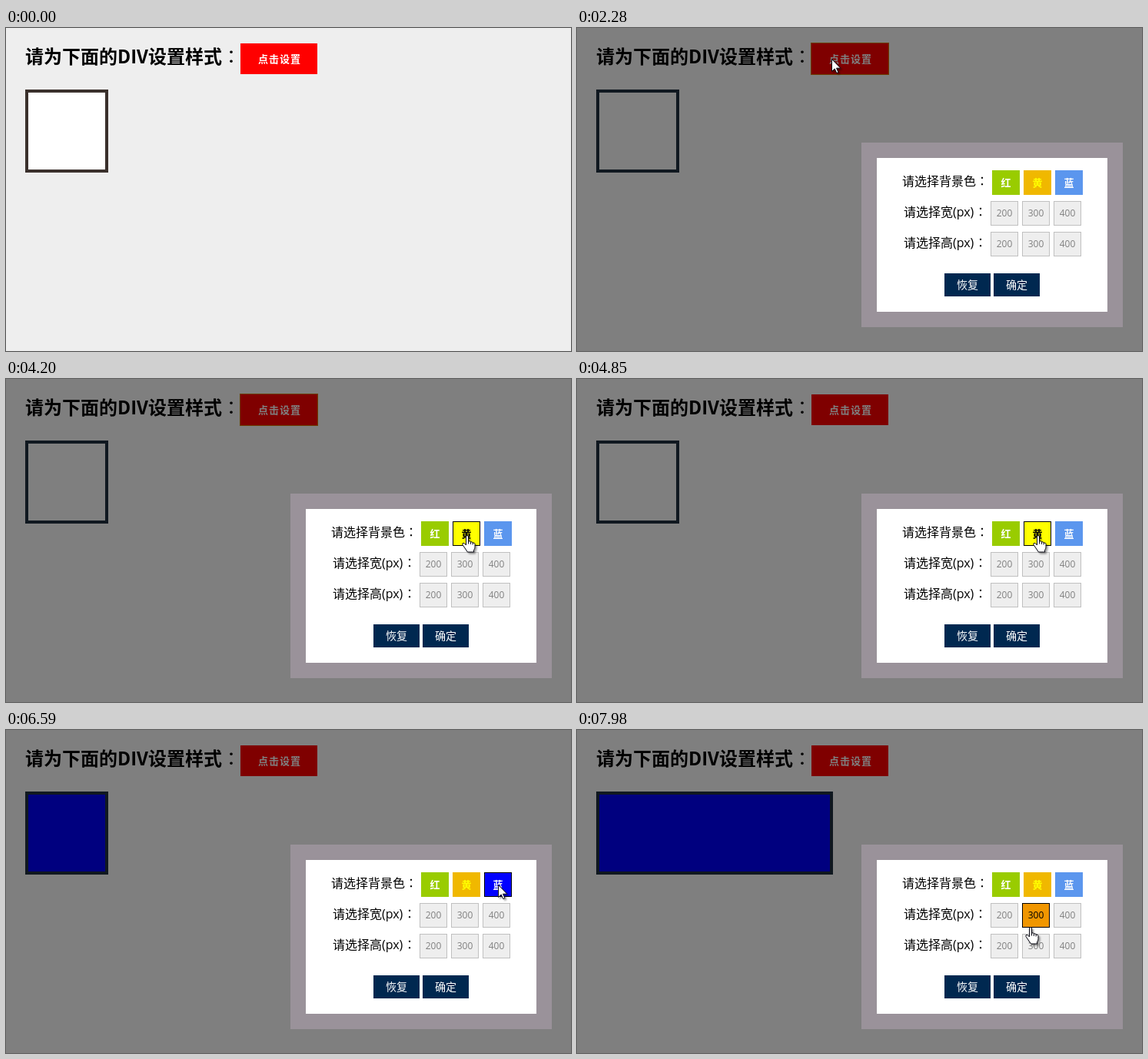
Write an HTML page that moves like this. It is 735 px wide and 420 px high and loops after 8000 ms.

```html
<!DOCTYPE html>
<html lang="zh-CN">
<head>
<meta charset="utf-8">
<title>设置样式</title>
<style>
html, body { margin: 0; height: 100%; overflow: hidden; background: #eee; }
svg { display: block; width: 735px; height: 420px; }
text { font-family: "Open Sans", "Noto Sans CJK SC", sans-serif; }
.title { font-family: "Noto Sans CJK SC", sans-serif; font-weight: 700; }
.colon { font-family: "Noto Sans CJK TC", sans-serif; }
.mid { text-anchor: middle; }
.cursor { fill: #fff; stroke: #0a0a14; stroke-linejoin: round; filter: drop-shadow(2px 2px 1px rgba(0, 0, 0, .4)); }
.beam { fill: none; stroke: #000; }
</style>
</head>
<body>
<svg id="stage" viewBox="0 0 735 420"></svg>
<script>
const LOOP = 8000;
const stage = document.getElementById('stage');

// When the page changes
const focus = 2020, open = 2280, blur = 4850, yellow = 5020, red = 5850, blue = 6590, wide = 7630;

// Pointer moves: begin, end, then where it arrives
const entry = { x: 720, y: 430 };
const moves = [
  [500, 1190, 334, 96], [1190, 1490, 331, 40],
  [2580, 3000, 60, 124], [3000, 3390, 503, 194], [3390, 3690, 562, 202],
  [3960, 4500, 651, 204], [4500, 4790, 599, 203], [5250, 5550, 554, 202],
  [6020, 6330, 648, 203], [6330, 6560, 640, 201],
  [6780, 7230, 589, 239], [7860, 7980, 589, 256]
];

function pointer(t) {
  let { x, y } = entry;
  for (const [begin, end, toX, toY] of moves) {
    const u = Math.min(1, Math.max(0, (t - begin) / (end - begin)));
    const k = u * u * (3 - 2 * u);
    x += (toX - x) * k;
    y += (toY - y) * k;
  }
  return { x, y };
}

const swatch = (label, bg, ink, hotBg, hotInk) => ({ label, bg, edge: bg, ink, hotBg, hotInk, x: 540, y: 185, size: 13, weight: 600 });
const size = y => label => ({ label, bg: '#eee', edge: '#c0c0c0', ink: '#808080', hotBg: '#f09600', hotInk: '#000', x: 538, y, size: 12, weight: 400 });
const rows = [
  [swatch('红', '#9c0', '#fff', '#f00', '#fff'),
   swatch('黄', '#f0b800', '#ff0', '#ff0', '#000'),
   swatch('蓝', '#5b96ee', '#fff', '#00f', '#fff')],
  [200, 300, 400].map(size(225)),
  [200, 300, 400].map(size(265))
];
const options = rows.flatMap(row => row.map((o, i) => ({ ...o, x: o.x + 41 * i })));

const rect = (x, y, w, h, fill, more = '') =>
  `<rect x="${x}" y="${y}" width="${w}" height="${h}" fill="${fill}" ${more}/>`;
const text = (x, y, size, str, fill = '#000', more = '') =>
  `<text x="${x}" y="${y}" font-size="${size}" fill="${fill}" ${more}>${str}</text>`;
const colon = (x, y, size) => text(x, y, size, '：', '#000', 'class="colon"');
const within = (p, x, y, w, h) => p.x >= x && p.x < x + w && p.y >= y && p.y < y + h;

function pageView(t) {
  const shown = t >= open;
  const fill = t < yellow ? '#fff' : t < red ? '#ff0' : t < blue ? '#f00' : '#00f';
  const edge = shown ? '#203040' : '#3a302c';
  return rect(0, 0, 735, 420, shown ? '#fff' : '#eee')
    + text(25, 46, 24, '请为下面的DIV', '#000', 'class="title"')
    + text(185, 46, 24, '设置样式', '#000', 'class="title"')
    + colon(281, 46, 24)
    + rect(305, 20, 100, 40, '#f00')
    + (t >= focus && t < blur ? rect(304.5, 19.5, 101, 41, 'none', 'stroke="#d87800"') : '')
    + text(328, 45, 13, '点击设置', '#fff', 'font-weight="600" letter-spacing="1"')
    + rect(27, 82, t < wide ? 104 : 304, 104, fill, `stroke="${edge}" stroke-width="4"`)
    + (shown ? rect(0, 0, 735, 420, '#000', 'opacity=".5"') : '');
}

function optionView(o, hot) {
  return rect(o.x + .5, o.y + .5, 35, 31, hot ? o.hotBg : o.bg, `stroke="${hot ? '#000' : o.edge}"`)
    + text(o.x + 18, o.y + 8 + o.size, o.size, o.label, hot ? o.hotInk : o.ink,
      `class="mid" font-weight="${o.weight}"`);
}

function dialogView(hot) {
  const label = (x, y, str, colonX) => text(x, y, 16, str) + colon(colonX, y, 16);
  const button = (x, str) => rect(x, 319, 60, 30, '#002850')
    + text(x + 30, 339, 14, str, '#fff', 'class="mid"');
  return rect(370, 149, 340, 240, '#9a929a') + rect(390, 169, 300, 200, '#fff')
    + label(423, 205, '请选择背景色', 519)
    + label(425, 245, '请选择宽(px)', 517)
    + label(425, 285, '请选择高(px)', 517)
    + options.map(o => optionView(o, o === hot)).join('')
    + button(478, '恢复') + button(542, '确定');
}

const arrow = '<path class="cursor" d="M.5 .5V16.5L4.2 13L6.8 18.6L9 17.6L6.5 12.2H11.8Z"/>';
const hand = `<path class="cursor" d="M-.5 2Q-.5 .5 1 .5T2.5 2V8Q5 7 5.3 9Q7.6 8 8.1 10Q10.5 9.5 11 11.5
  V15.5Q11 18 9.5 19.5V22H1.5L-5 12.5Q-5.6 10.3 -3.8 10.3Q-2.2 10.6 -.5 13Z
  M2.5 8V11.5M5.3 9V12M8.1 10V12.5"/>`;
const beam = '<path class="beam" d="M-3 -8.5H3M-3 8.5H3M0 -8.5V8.5"/>';

function cursorView(t, p, hot) {
  // A click shows the arrow for a moment
  const clicked = [yellow, blue].some(c => t >= c && t < c + 30);
  const onLabel = t >= open && within(p, 423, 184, 108, 32);
  const shape = onLabel ? beam : hot && !clicked ? hand : arrow;
  return `<g transform="translate(${Math.round(p.x)} ${Math.round(p.y)})">${shape}</g>`;
}

function draw(t) {
  const p = pointer(t), shown = t >= open;
  const hot = shown && options.find(o => within(p, o.x, o.y, 36, 32));
  stage.innerHTML = pageView(t) + (shown ? dialogView(hot) : '') + cursorView(t, p, hot);
}

const start = performance.now();
function tick() {
  draw((performance.now() - start) % LOOP);
  requestAnimationFrame(tick);
}
tick();
</script>
</body>
</html>
```
